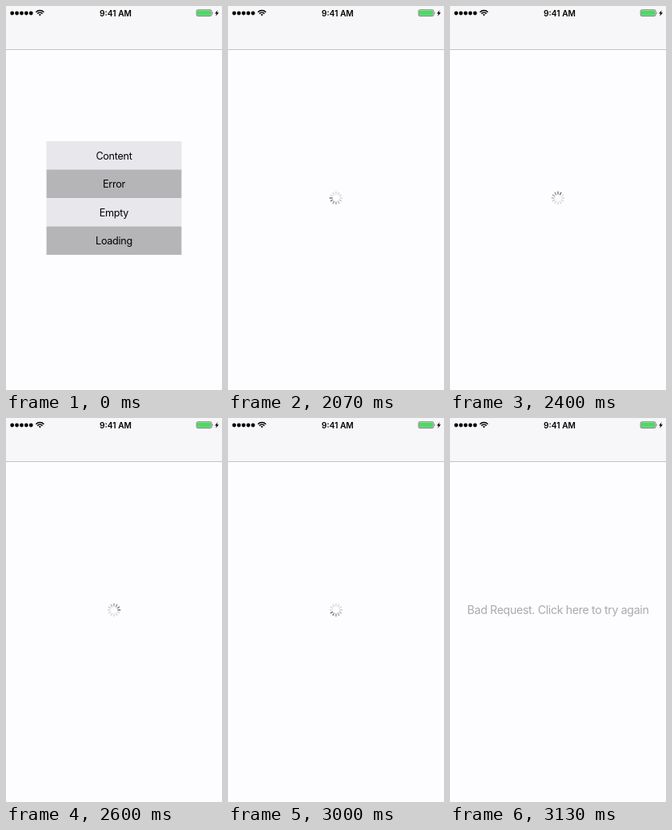
These frames come from a looping animation (270x480 px, 4.74 s). An HTML page:

```html
<!DOCTYPE html>
<html>
<head>
<meta charset="utf-8">
<style>
html, body { margin: 0; width: 100%; height: 100%; overflow: hidden; background: #fdfcfe; }
svg { display: block; width: 100vw; height: 100vh; }
text { font-family: Inter, Roboto, sans-serif; text-anchor: middle; }
#menu text { font-size: 12.6px; letter-spacing: -.28px; }
#message { font-size: 14.2px; letter-spacing: -.35px; fill: #aaa9ac; }
</style>
</head>
<body>
<svg viewBox="0 0 270 480">
  <rect width="270" height="480" fill="#fdfcfe"/>
  <rect width="270" height="54" fill="#f7f6f8"/>
  <rect y="54" width="270" height="1" fill="#c3c2c5"/>
  <path d="M7.7 9h24" stroke="#000" stroke-width="4.8" stroke-linecap="round" stroke-dasharray="0 5.9"/>
  <g fill="none" stroke="#000" stroke-width="1.5">
    <path d="M37.4 7.7a7 7 0 0 1 10 0M39.3 9.6a4.4 4.4 0 0 1 6.2 0"/>
    <path d="M40.9 10.8a2.2 2.2 0 0 1 3 0L42.4 12.4z" fill="#000" stroke="none"/>
  </g>
  <text x="137" y="12.6" font-size="10.2" font-weight="600">9:41 AM</text>
  <rect x="238.2" y="4.8" width="18.8" height="7.8" rx="1.6" fill="#f7f6f8" stroke="#444" stroke-width=".7"/>
  <rect x="239" y="5.6" width="17.2" height="6.2" rx=".9" fill="#4cd964"/>
  <path d="M257.8 7.2q1.5 1.5 0 3z" fill="#333"/>
  <path d="M264.6 5.2l-3.6 4.2h2.1l-.9 3.4 3.8-4.5h-2.2z"/>
  <g id="menu"></g>
  <g id="spinner" stroke="#6f6e72" stroke-width="1.45" stroke-linecap="round"></g>
  <text id="message" x="135" y="245">Bad Request. Click here to try again</text>
</svg>
<script>
const LOOP = 4740, PRESS = 1000, LOAD = 2070, FAIL = 3130, SPOKES = 12;
const $ = id => document.getElementById(id);

function add(parent, tag, attrs, text = '') {
  const el = document.createElementNS('http://www.w3.org/2000/svg', tag);
  for (const key in attrs) el.setAttribute(key, attrs[key]);
  el.textContent = text;
  return parent.appendChild(el);
}

const labels = ['Content', 'Error', 'Empty', 'Loading'].map((name, i) => {
  const y = 169 + i * 35.5;
  add($('menu'), 'rect', { x: 50.6, y, width: 168.8, height: 35.5, fill: i % 2 ? '#b5b4b7' : '#e8e7ec' });
  return add($('menu'), 'text', { x: 135, y: y + 22.5 }, name);
});

const spokes = Array.from({ length: SPOKES }, (_, i) =>
  add($('spinner'), 'path', { d: 'M0-4.9V-7.7', transform: `translate(135 240) rotate(${i * 360 / SPOKES})` }));

const show = (id, on) => $(id).setAttribute('visibility', on ? 'visible' : 'hidden');

function draw(t) {
  show('menu', t < LOAD);
  show('spinner', t >= LOAD && t < FAIL);
  show('message', t >= FAIL);
  labels[1].setAttribute('fill', t < PRESS ? '#000' : '#8f8e91');
  // The dark head advances one spoke at a time, one turn per second.
  const head = Math.floor(9.5 + (t - LOAD) * SPOKES / 1000);
  spokes.forEach((spoke, i) => {
    const age = ((head - i) % SPOKES + SPOKES) % SPOKES;
    spoke.setAttribute('opacity', Math.max(.25, 1 - age * .13));
  });
}

const start = performance.now();
function tick() {
  draw((performance.now() - start) % LOOP);
  requestAnimationFrame(tick);
}
tick();
</script>
</body>
</html>
```
